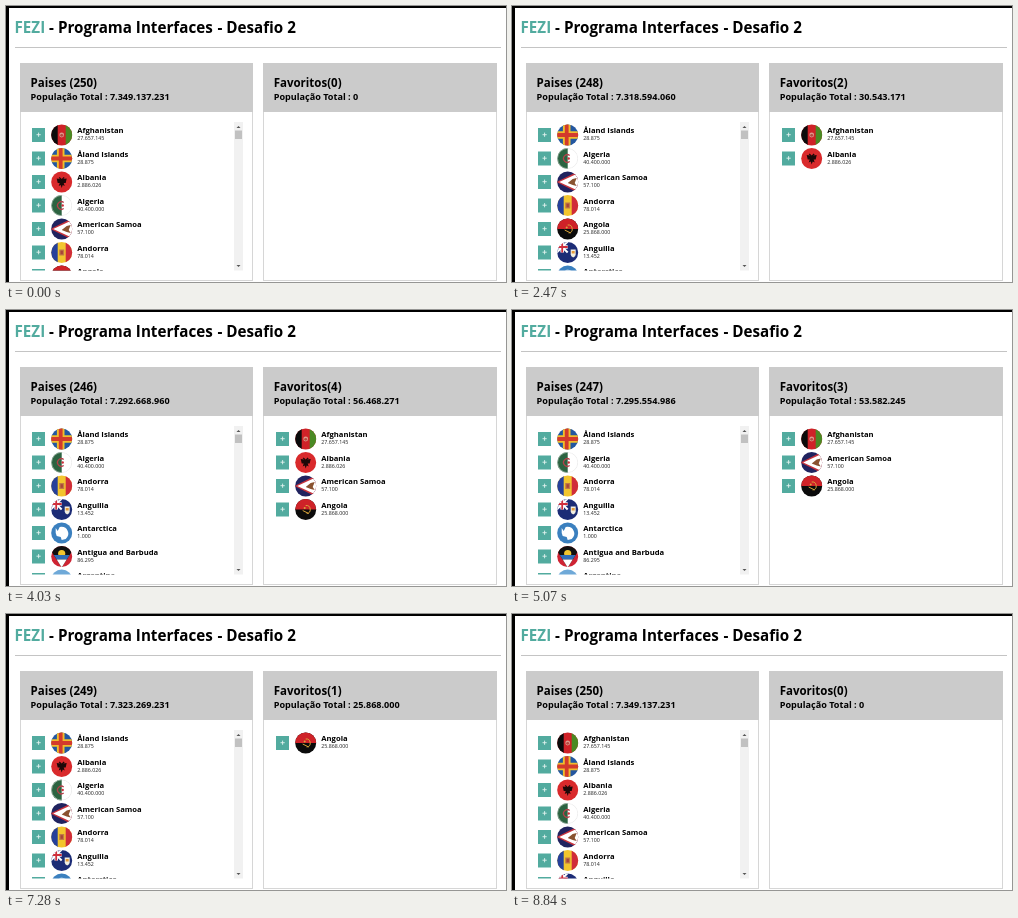
An HTML page that plays this animation: 500 px wide and 276 px high, repeating every 9750 ms.

```html
<!DOCTYPE html>
<html lang="pt-BR">
<head>
<meta charset="utf-8">
<style>
html, body { margin: 0; width: 100%; height: 100%; overflow: hidden; background: #fff; }
svg { display: block; font-family: "Open Sans", "Noto Sans", sans-serif; font-weight: 700; }
.title { font-size: 15.2px; }
.head { font-size: 11.5px; }
.total { font-size: 9.1px; }
.name { font-size: 7.65px; }
.pop { font-size: 5.3px; font-weight: 400; fill: #222; }
</style>
</head>
<body>
<svg width="500" height="276" viewBox="0 0 500 276">
  <defs>
    <clipPath id="disc"><circle r="10.5"/></clipPath>
    <clipPath id="list"><rect x="14" y="110" width="214" height="154.5"/></clipPath>
  </defs>
  <path d="M0 0H500V2H3V276H0Z"/>
  <text class="title" x="8.5" y="27"><tspan fill="#52ab9f">FEZI</tspan> - Programa Interfaces</text>
  <text class="title" x="211.5" y="27">- Desafio 2</text>
  <path d="M9 41.5H495" stroke="#c4c4c4"/>
  <g fill="#fff" stroke="#d6d6d6">
    <rect x="14.5" y="57.5" width="232" height="217"/>
    <rect x="257.5" y="57.5" width="233" height="217"/>
  </g>
  <path d="M14 57H247V106H14ZM257 57H491V106H257Z" fill="#cbcbcb"/>
  <path d="M228 116H237V264.5H228Z" fill="#f1f1f1"/>
  <path d="M229 124.5H236V133H229Z" fill="#c1c1c1"/>
  <path d="M230.5 122L232.5 120L234.5 122ZM230.5 259L232.5 261L234.5 259Z" fill="#555"/>
  <g id="view"></g>
</svg>
<script>
const rect = (x, y, w, h, fill) => `<rect x="${x}" y="${y}" width="${w}" height="${h}" fill="${fill}"/>`;
const disc = (x, y, r, fill) => `<circle cx="${x}" cy="${y}" r="${r}" fill="${fill}"/>`;
const shape = (d, fill) => `<path d="${d}" fill="${fill}"/>`;
const line = (d, color, width) => `<path d="${d}" fill="none" stroke="${color}" stroke-width="${width}"/>`;
const field = color => rect(-11, -11, 22, 22, color);
const columns = (a, b, c) => field(b) + rect(-11, -11, 7, 22, a) + rect(4, -11, 7, 22, c);
const cross = (color, width) => line('M-1 -11V11M-11 0H11', color, width);

const flags = [
  columns('#0b0b0b', '#cf2228', '#4a8a24') + disc(0, 0, 2.4, '#dd9a8c') + disc(0, .3, 1.4, '#b8473f'),
  field('#2357a0') + cross('#f0bd2c', 7.6) + cross('#d33a2c', 3.8),
  field('#d92a2c') + shape('M0 -3L-2 -5L-3 -4L-1.5 -3L-5 -3.5L-4 1L-2 1L-3 4L-1 3L0 6L1 3L3 4L2 1L4 1L5 -3.5L1.5 -3L3 -4L2 -5Z', '#1c0808'),
  field('#fff') + rect(-11, -11, 11, 22, '#2c6341') + line('M2 -3A3.8 3.8 0 1 0 2 3', '#b5404a', 1.3) + disc(1, 0, 1.2, '#cf2f3c')
    + '<circle r="10.2" fill="none" stroke="#ddd" stroke-width=".6"/>',
  field('#20235f') + shape('M-11 0L11 -11V11Z', '#c5323c') + shape('M-8.5 0L11 -9V9Z', '#fff')
    + shape('M0 1L5 -3L9 -4L7 1L9 4L5 3Z', '#8a5230'),
  columns('#26409a', '#f2c52e', '#d02c3a') + rect(-2.5, -3, 5, 6, '#c07a45') + rect(-1.2, -1.8, 2.4, 3.6, '#a94438'),
  field('#0b0b0b') + rect(-11, -11, 22, 11, '#cf2228') + line('M0 -4A4 4 0 0 1 1 4M-3 1L3 4', '#d9a53a', 1) + disc(-1, -1.5, 1, '#d9a53a'),
  field('#1c2c76') + line('M-11 -11L0 0M0 -11L-11 0', '#fff', 2) + line('M-5.5 -11V0M-11 -5.5H0', '#fff', 3.6)
    + line('M-5.5 -11V0M-11 -5.5H0', '#cf2f3c', 1.8) + shape('M3 -3H8V2Q8 4 5.5 5Q3 4 3 2Z', '#f1efe2') + rect(4, -1.5, 3, 2.5, '#e59a3a'),
  field('#3b80bf') + shape('M-6 -5L-4 -2L-2 -6Q4 -7 6 -2Q8 2 4 6L0 7L-1 4L-5 3L-6 0Z', '#fff'),
  field('#cf2433') + shape('M-14 -11H14L0 11Z', '#101010') + disc(0, -3, 3.6, '#f2c52e') + shape('M-8 -1.5H8L5 3H-5Z', '#2f6db8') + shape('M-5 3H5L0 11Z', '#fff'),
  field('#fff') + rect(-11, -11, 22, 7, '#6fa9d8') + rect(-11, 4, 22, 7, '#6fa9d8') + disc(0, 0, 2, '#eebb3c')
];

const countries = [
  ['Afghanistan', 27657145], ['Åland Islands', 28875], ['Albania', 2886026], ['Algeria', 40400000],
  ['American Samoa', 57100], ['Andorra', 78014], ['Angola', 25868000], ['Anguilla', 13452],
  ['Antarctica', 1000], ['Antigua and Barbuda', 86295], ['Argentina', 43590400]
].map(([name, population], i) => ({ name, population, flag: flags[i] }));

const LOOP = 9750, COUNT = 250, POPULATION = 7349137231;
// Start time and indices of the favourite countries
const steps = [
  [0, []], [1560, [0]], [2470, [0, 2]], [3120, [0, 2, 4]], [4030, [0, 2, 4, 6]],
  [5070, [0, 4, 6]], [6110, [0, 6]], [7280, [6]], [8710, []]
];

const format = n => String(n).replace(/\B(?=(\d{3})+$)/g, '.');

const row = ({ name, population, flag }, i) => `<g transform="translate(0 ${129 + i * 23.5})">
  ${rect(26, -7, 13, 14, '#52ab9f')}${line('M30.5 -.3H34.7M32.6 -2.4V1.8', '#e4f3f0', .9)}
  <g transform="translate(55.7 0)" clip-path="url(#disc)">${flag}</g>
  <text class="name" x="71.3" y="-1.6">${name}</text>
  <text class="pop" x="71.3" y="5">${format(population)}</text></g>`;

const header = (x, title, total) => `<text class="head" x="${x}" y="80.5">${title}</text>
  <text class="total" x="${x}" y="94">População Total : ${format(total)}</text>`;

function render(index) {
  const chosen = steps[index][1];
  const before = index ? steps[index - 1][1] : [];
  const favorites = chosen.map(i => countries[i]);
  // A country just returned waits at the far end of the list until the next sort
  const others = countries.filter((_, i) => !chosen.includes(i) && !before.includes(i)).slice(0, 7);
  const sum = favorites.reduce((total, c) => total + c.population, 0);
  view.innerHTML = header(24.6, `Paises (${COUNT - favorites.length})`, POPULATION - sum)
    + header(267.7, `Favoritos(${favorites.length})`, sum)
    + `<g clip-path="url(#list)">${others.map(row).join('')}</g>`
    + `<g transform="translate(244 0)">${favorites.map(row).join('')}</g>`;
}

const view = document.getElementById('view');
let current;
function tick() {
  const time = performance.now() % LOOP;
  const index = steps.filter(([start]) => start <= time).length - 1;
  if (index !== current) render(current = index);
  requestAnimationFrame(tick);
}
tick();
</script>
</body>
</html>
```
